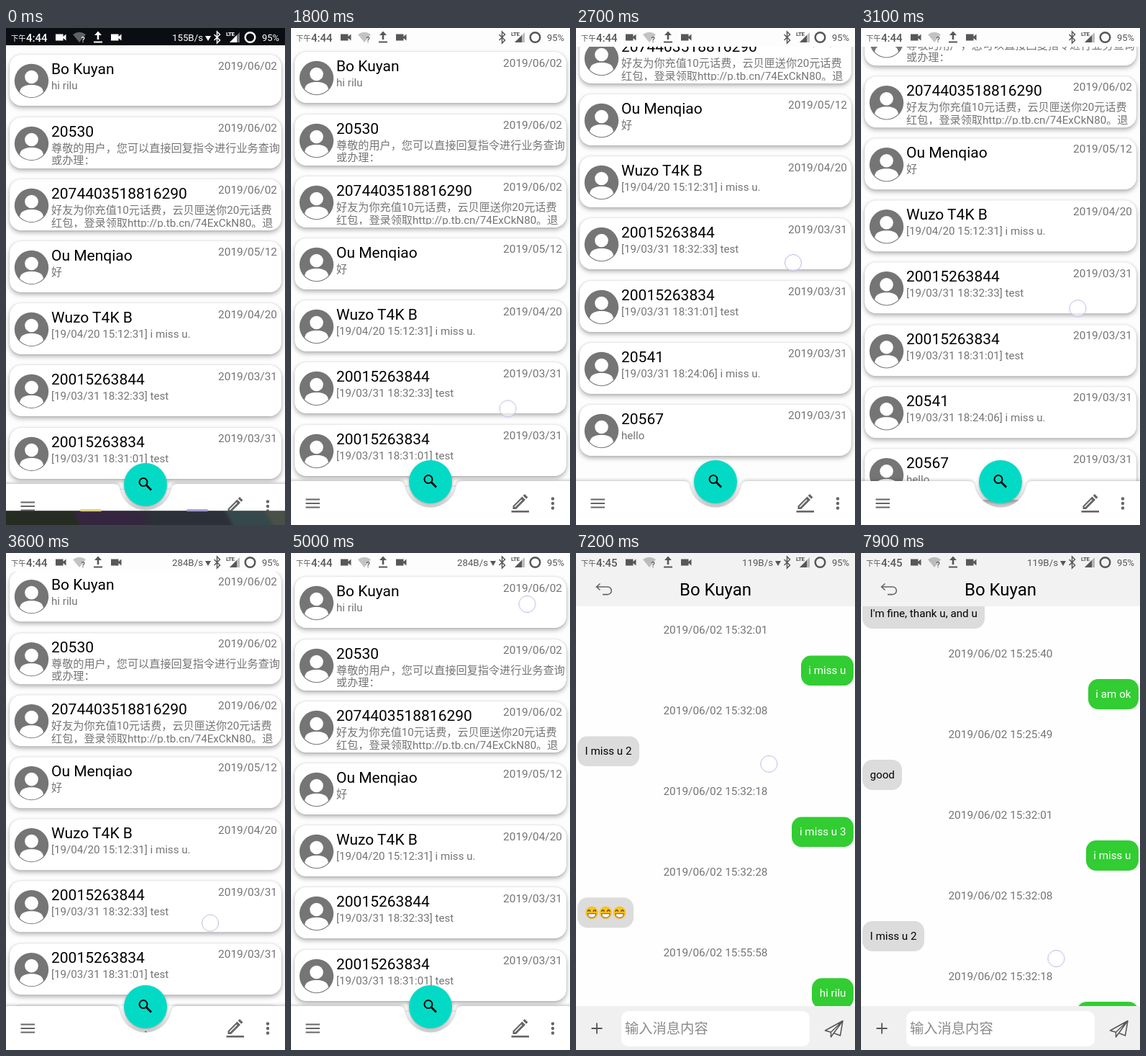
Animation of 388x690 px, one loop 8000 ms. Source, as an HTML page:

```html
<!DOCTYPE html>
<html lang="zh-CN">
<head>
<meta charset="utf-8">
<title>Messages</title>
<style>
html, body { margin: 0; width: 100%; height: 100%; overflow: hidden; background: #fdfdfd; }
body { font: 15.4px/18px Roboto, "Noto Sans CJK SC", "Noto Sans CJK", sans-serif; white-space: nowrap; }
svg { position: absolute; left: 0; top: 0; overflow: visible; }
.stage { position: absolute; left: 0; top: 0; width: 388px; height: 690px; overflow: hidden; background: #fdfdfd; }
.stage div { position: absolute; }

/* conversation list */
.list { inset: 0; animation: settle 8s infinite; }
.view { left: 0; right: 0; top: 26px; bottom: 0; overflow: hidden; }
.rows { left: 0; right: 0; top: -26px; animation: scroll 8s linear infinite; }
.card { left: 5px; width: 378px; height: 71px; border-radius: 16px; background: #fff;
  box-shadow: 0 3px 6px rgba(0,0,0,.3), 0 0 2px rgba(0,0,0,.18); }
.name { left: 58px; top: 8px; font-size: 21px; line-height: 24px; color: #000; }
.date { right: 6px; top: 6.5px; color: #757575; }
.text { left: 58px; top: 35.2px; height: 31.8px; font-size: 15.15px; line-height: 17.7px; color: #757575; overflow: hidden; }
.bar { filter: drop-shadow(0 -1px 2px rgba(0,0,0,.25)); }
.fab { left: 164px; top: 599.5px; width: 60px; height: 60px; border-radius: 50%; background: #03dac6;
  box-shadow: 0 3px 5px rgba(0,0,0,.3); }
.strip { left: 0; right: 0; bottom: 0; height: 20px; animation: strip 8s infinite;
  background: linear-gradient(60deg, #262c22 25%, #35263f 27% 48%, #2c3038 52% 78%, #35494c 80% 92%, #4a5048 94%); }
.strip div { top: -2px; width: 30px; height: 3px; border-radius: 2px; }

/* conversation */
.chat { inset: 0; background: #fefefe; animation: rise 8s infinite, fade 8s infinite; }
.pane { left: 0; right: 0; top: 74px; height: 555px; overflow: hidden; }
.feed { left: 0; right: 0; top: -74px; animation: pull 8s infinite; }
.head { left: 0; right: 0; top: 0; height: 74px; background: #f2f2f2; }
.title { left: 0; right: 0; top: 36px; text-align: center; font-size: 24px; line-height: 30px; color: #000; }
.foot { left: 0; right: 0; bottom: 0; height: 61px; background: #f0f0f0; }
.field { left: 63px; top: 7px; width: 257px; height: 49px; padding-left: 5px; border-radius: 10px;
  background: #fff; color: #8a8a8a; font-size: 19.3px; line-height: 49px; }
.time { left: 0; right: 0; height: 18px; text-align: center; color: #757575; }
.msg { height: 42px; padding: 0 10.5px; border-radius: 14px; line-height: 42px; font-size: 15.2px; }
.in { left: 2px; background: #dcdcdc; color: #000; }
.out { right: 2px; background: #32cd32; color: #fff; }

/* status bar */
.status { left: 0; right: 0; top: 0; height: 24px; animation: status 8s infinite; }
.status div { line-height: 16px; top: 5.5px; }
.clock { left: 28px; font-size: 15px; font-weight: 500; }
.speed { right: 114px; font-size: 13.3px; }
.speed::after { content: ""; position: absolute; left: 100%; top: 5px; margin-left: 2.5px;
  border: solid transparent; border-width: 7px 4px 0; border-top-color: currentColor; }
.old { animation: old 8s step-end infinite; }
.new { animation: new 8s step-end infinite; }
.s1 { animation: s1 8s step-end infinite; }
.s2 { animation: s2 8s step-end infinite; }
.s3 { animation: s3 8s step-end infinite; }

.stage .touch { left: -12.5px; top: -12.5px; width: 22px; height: 22px; border-radius: 50%;
  border: 1.5px solid #b9b6e0; background: rgba(255,255,255,.55);
  animation: move 8s linear infinite, tap 8s step-end infinite; }

@keyframes settle {
  0% { transform: translateY(4px); animation-timing-function: ease-out }
  4%, 100% { transform: none }
}
@keyframes strip {
  0% { transform: none; animation-timing-function: ease-out }
  4%, 100% { transform: translateY(24px) }
}
@keyframes status {
  0%, .5% { color: #fff; background: #0a0d12 }
  5%, 100% { color: #575757; background: rgba(10,13,18,0) }
}
@keyframes scroll {
  0%, 22.5% { transform: none; animation-timing-function: cubic-bezier(.4,0,.75,.65) }
  28.75% { transform: translateY(-130px); animation-timing-function: cubic-bezier(.3,.5,.6,1) }
  33.75% { transform: translateY(-200px); animation-timing-function: cubic-bezier(.4,0,.7,.5) }
  38.75% { transform: translateY(-139px) }
  45% { transform: translateY(-9px); animation-timing-function: ease-out }
  46.25%, 100% { transform: none }
}
@keyframes move {
  0%, 22.5% { transform: translate(301.5px, 528.5px); animation-timing-function: cubic-bezier(.4,0,.75,.65) }
  28.75% { transform: translate(300px, 380px); animation-timing-function: cubic-bezier(.3,.5,.6,1) }
  33.75% { transform: translate(302px, 326px); animation-timing-function: cubic-bezier(.4,0,.7,.5) }
  38.75% { transform: translate(301.5px, 389px) }
  45% { transform: translate(284px, 513.5px); animation-timing-function: ease-out }
  50%, 54.37% { transform: translate(282px, 545px) }
  54.38%, 80% { transform: translate(328.5px, 71px) }
  80.01%, 87.5% { transform: translate(268px, 262px); animation-timing-function: ease-in-out }
  98.75%, 100% { transform: translate(271.5px, 563px) }
}
@keyframes tap {
  0% { opacity: 0 } 22.375% { opacity: 1 } 54.375% { opacity: 0 }
  62.375% { opacity: 1 } 66.125% { opacity: 0 } 87.375%, 100% { opacity: 1 }
}
@keyframes rise {
  0%, 71.125% { transform: translateY(55px); animation-timing-function: cubic-bezier(.22,1,.36,1) }
  75.5%, 100% { transform: none }
}
@keyframes fade {
  0%, 71.125% { opacity: 0; animation-timing-function: cubic-bezier(.25,1,.5,1) }
  73.625%, 100% { opacity: 1 }
}
@keyframes pull {
  0%, 87.5% { transform: none; animation-timing-function: ease-in-out }
  98.75%, 100% { transform: translateY(286px) }
}
@keyframes old { 0% { opacity: 1 } 69.875%, 100% { opacity: 0 } }
@keyframes new { 0% { opacity: 0 } 69.875%, 100% { opacity: 1 } }
@keyframes s1 { 0% { opacity: 1 } 2.375%, 100% { opacity: 0 } }
@keyframes s2 { 0% { opacity: 0 } 43.625% { opacity: 1 } 66.125%, 100% { opacity: 0 } }
@keyframes s3 { 0% { opacity: 0 } 88.625%, 100% { opacity: 1 } }
</style>
</head>
<body>
<div class="stage">
  <svg width="0" height="0">
    <defs>
      <g id="avatar">
        <circle r="23.7" fill="#757575"/>
        <circle cy="-5.5" r="9.3" fill="#fff"/>
        <path d="M-16.5 15.500C-15.500 8-9 5.500 0 5.500S15.500 8 16.500 15.500A22.600 22.600 0 0 1-16.500 15.500Z" fill="#fff"/>
      </g>
      <g id="grin">
        <circle r="8.7" fill="#fcc21b"/>
        <path d="M-6-1.5q2-4 4.2 0M1.8-1.5q2.2-4 4.2 0" fill="none" stroke="#5d4037" stroke-width="1.4"/>
        <path d="M-6 1.5H6Q5 7 0 7T-6 1.5Z" fill="#fff" stroke="#5d4037" stroke-width=".9"/>
      </g>
      <path id="cam" d="M-7-4.5H3.5V-1L7.5-4.5V4.5L3.5 1V4.5H-7Z"/>
    </defs>
  </svg>

  <div class="list">
    <div class="view"><div class="rows"></div></div>
    <svg class="bar" width="388" height="690">
      <path fill="#fff" d="M-5 629H150Q157 629 158 635A36.5 36.5 0 0 0 230 635Q231 629 238 629H393V710H-5Z"/>
    </svg>
    <div class="fab"></div>
    <svg width="388" height="690" fill="#666">
      <path d="M20.5 654.5h19.5M20.5 660h19.5M20.5 665.5h19.5" stroke="#666" stroke-width="2"/>
      <g fill="none" stroke="#000">
        <circle cx="191" cy="626.5" r="5.5" stroke-width="2"/>
        <path d="M195 630.5l7 7" stroke-width="2.6"/>
      </g>
      <path d="M308.500 668v-4.500l13-13 4.500 4.500-13 13ZM322.700 649.300l2.300-2.300 4.500 4.500-2.300 2.300Z"/>
      <path d="M311 665l10-10" stroke="#fff" stroke-width="1.5"/>
      <path d="M306.5 670h24.5v2.600h-24.500Z"/>
      <circle cx="364" cy="653.5" r="2.2"/><circle cx="364" cy="660" r="2.2"/><circle cx="364" cy="666.5" r="2.2"/>
    </svg>
  </div>
  <div class="strip">
    <div style="left:103px;background:#d9d27a"></div>
    <div style="left:251px;background:#a79ad0"></div>
  </div>

  <div class="chat">
    <div class="pane"><div class="feed"></div></div>
    <div class="head">
      <div class="title">Bo Kuyan</div>
      <svg width="388" height="74" fill="none" stroke="#666" stroke-width="1.6">
        <path d="M33.5 42.5L28.5 47l5 4.5M28.5 47H44a5.3 5.3 0 0 1 0 10.6H37"/>
      </svg>
    </div>
    <div class="foot">
      <div class="field">输入消息内容</div>
      <svg width="388" height="61" fill="none" stroke="#555" stroke-width="1.8">
        <path d="M21.5 31h15M29 23.5v15"/>
        <path d="M346.5 34L371 20.5 367.5 41 358.5 37.5 354.5 43V36.2ZM354.5 36.2L371 20.5 358.5 37.5" stroke-width="1.5" stroke-linejoin="round"/>
      </svg>
    </div>
  </div>

  <div class="status">
    <div style="left:7px;top:7px;font-size:10.3px">下午</div>
    <div class="clock old">4:44</div>
    <div class="clock new">4:45</div>
    <div class="speed s1">155B/s</div>
    <div class="speed s2">284B/s</div>
    <div class="speed s3">119B/s</div>
    <div style="left:306px;top:.5px;font-size:8px;font-weight:700;letter-spacing:-.5px">LTE</div>
    <div style="left:356px;font-size:13px">95%</div>
    <svg width="388" height="24" fill="currentColor">
      <use href="#cam" x="76" y="13"/>
      <use href="#cam" x="153" y="13"/>
      <path d="M93 9Q102 2.5 111 9L102 20Z" opacity=".35"/>
      <text x="104.5" y="19.5" font-size="11" font-weight="500">?</text>
      <path d="M128 4.5l5 5.5h-3.7v6h-2.6v-6H123ZM122 18.5h12v2h-12Z"/>
      <path d="M325 6V20H311Z" opacity=".4"/><path d="M321 10V20H311Z"/>
      <g fill="none" stroke="currentColor">
        <path d="M289.5 9l8 8-4 4V5l4 4-8 8" stroke-width="1.5"/>
        <circle cx="339.5" cy="13" r="6.8" stroke-width="2.5"/>
      </g>
    </svg>
  </div>
  <div class="touch"></div>
</div>

<script>
const rows = [
  ["Bo Kuyan", "2019/06/02", "hi rilu"],
  ["20530", "2019/06/02", "尊敬的用户，您可以直接回复指令进行业务查询<br>或办理："],
  ["2074403518816290", "2019/06/02", "好友为你充值10元话费，云贝匣送你20元话费<br>红包，登录领取http://p.tb.cn/74ExCkN80。退"],
  ["Ou Menqiao", "2019/05/12", "好"],
  ["Wuzo T4K B", "2019/04/20", "[19/04/20 15:12:31] i miss u."],
  ["20015263844", "2019/03/31", "[19/03/31 18:32:33] test"],
  ["20015263834", "2019/03/31", "[19/03/31 18:31:01] test"],
  ["20541", "2019/03/31", "[19/03/31 18:24:06] i miss u."],
  ["20567", "2019/03/31", "hello"]
];
document.querySelector(".rows").innerHTML = rows.map(([name, date, text], i) =>
  `<div class="card" style="top:${33.3 + 86.2 * i}px">
    <svg width="71" height="71"><use href="#avatar" x="30.5" y="36.5"/></svg>
    <div class="name">${name}</div><div class="date">${date}</div><div class="text">${text}</div>
  </div>`).join("");

const grins = `<svg width="78" height="42">${[20, 39.3, 58.6].map(x => `<use href="#grin" x="${x}" y="21"/>`).join("")}</svg>`;
const talk = [
  ["in", "I'm fine, thank u, and u"], "15:25:40",
  ["out", "i am ok"], "15:25:49",
  ["in", "good"], "15:32:01",
  ["out", "i miss u"], "15:32:08",
  ["in", "I miss u 2"], "15:32:18",
  ["out", "i miss u 3"], "15:32:28",
  ["in", `<span style="display:inline-block;width:57px"></span>${grins}`], "15:55:58",
  ["out", "hi rilu"]
];
document.querySelector(".feed").innerHTML = talk.map((item, i) => {
  const y = 56 * i - 202;
  return Array.isArray(item)
    ? `<div class="msg ${item[0]}" style="top:${y - 21}px">${item[1]}</div>`
    : `<div class="time" style="top:${y - 9}px">2019/06/02 ${item}</div>`;
}).join("");
</script>
</body>
</html>
```
